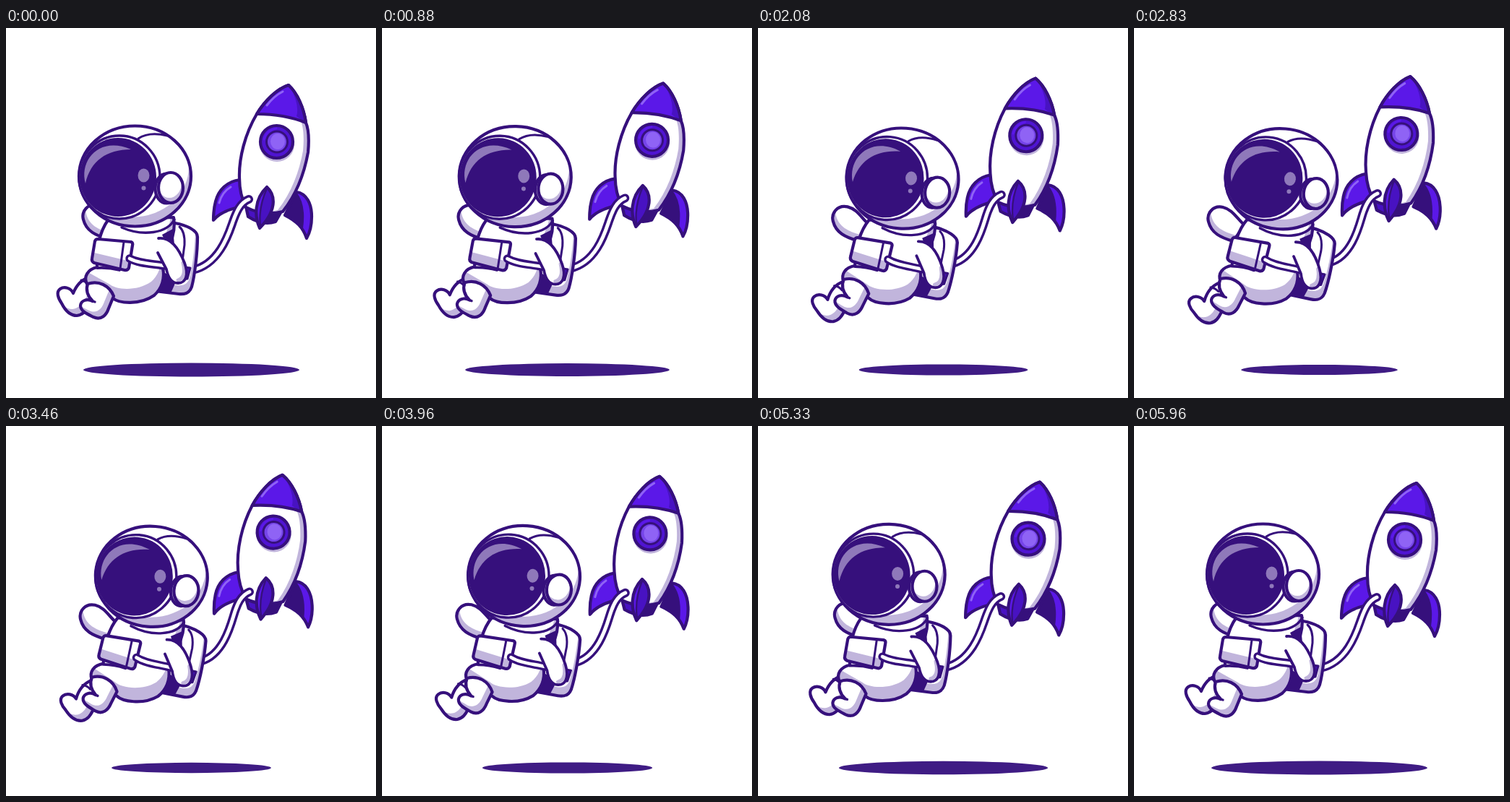
An HTML page that plays this animation: 512 by 512 pixels, repeating every 6000 ms.

```html
<!DOCTYPE html>
<html lang="en">
<head>
<meta charset="utf-8">
<title>Floating astronaut</title>
<style>
  html, body { margin: 0; width: 100%; height: 100%; overflow: hidden; background: #fff; }
  svg { display: block; width: 100vw; height: 100vh; }
</style>
</head>
<body>
<svg id="stage" viewBox="0 0 512 512" stroke-linecap="round" stroke-linejoin="round"></svg>
<script>
const INK = '#36107c', TINT = '#c1b5dc', VIOLET = '#5b18e8', DEEP = '#4812c2', PALE = '#8f63f5';
const LOOP = 6000;
const stage = document.getElementById('stage');
let clips = 0;

const fill = (d, color) => `<path d="${d}" fill="${color}"/>`;
const line = (d, width = 3.8, color = INK) =>
  `<path d="${d}" fill="none" stroke="${color}" stroke-width="${width}"/>`;
const oval = (cx, cy, rx, ry = rx) =>
  `M${cx - rx} ${cy}a${rx} ${ry} 0 1 1 ${2 * rx} 0a${rx} ${ry} 0 1 1 ${-2 * rx} 0Z`;
const group = (id, content) => `<g id="${id}">${content}</g>`;

// Filled outline with details clipped to its inside.
function part(d, color, details = '', width = 4.2) {
  const id = 'clip' + clips++;
  return `<clipPath id="${id}"><path d="${d}"/></clipPath>` + fill(d, color) +
    `<g clip-path="url(#${id})">${details}</g>` + line(d, width);
}

// White surface whose far edge falls into a tinted crescent.
const lit = (d, dx, dy, details = '') =>
  part(d, TINT, `<g transform="translate(${dx} ${dy})">${fill(d, '#fff')}</g>` + details);

function rocket() {
  const hull = 'M391 79C375 84 358 101 347 119C331 146 322 180 323 208C323 224 327 238 332 248' +
    'Q357 261 383 254C402 230 413 200 418 172C420 150 418 138 415 131C412 110 403 90 391 79Z';
  const cone = 'M391 79C375 84 358 101 347 119Q385 119 415 131C412 110 403 90 391 79Z';
  const leftFin = 'M324 210C306 212 294 224 290 240C287 251 287 259 287 266C295 256 308 250 331 246Z';
  const rightFin = 'M402 227C416 229 423 243 423 261C423 275 420 284 416 291C411 276 402 267 386 259Z';
  const keel = 'M361 220C374 232 374 254 351 277C344 261 343 237 361 220Z';
  return part(leftFin, VIOLET, line('M295 242Q299 227 311 220', 3, PALE)) +
    part(rightFin, VIOLET, fill('M400 225Q416 242 411 277L384 260Z', INK)) +
    part('M332 247L335 261Q355 274 373 268L382 252Z', DEEP, fill('M352 250H385L372 272H354Z', INK)) +
    lit(hull, -7, -2, fill(oval(375, 161, 24), TINT)) +
    part(cone, VIOLET, fill('M391 77Q407 106 402 122L420 136L414 90Z', DEEP) + line('M361 107Q371 94 383 88', 3, PALE)) +
    part(oval(374.5, 157.5, 22.5), '#4f14d2', line('M357 154Q361 141 374 139', 3, VIOLET)) +
    part(oval(375, 157.5, 14.5), '#7644ea', fill(oval(376, 157, 10, 11), PALE), 3) +
    part(keel, VIOLET, fill('M361 218C354 240 350 258 352 280L380 260V225Z', DEEP)) +
    line('M361 222C353 240 350 258 352 274', 2.4);
}

function pack() {
  const bag = 'M234 270C250 273 265 280 265 289C265 311 261 343 257 358C254 367 248 369 239 368L206 364L216 285Z';
  return lit(bag, -3, -12) +
    line('M240 275Q248 282 247 300L243 330', 3) +
    fill('M214 335L236 349L228 367L208 362Z', INK) +
    part('M246 331L255 332L251 347L236 349Z', DEEP, '', 3);
}

const raisedArm = () => lit(
  'M157 270C146 260 140 248 127 245C113 242 104 254 107 265C111 281 124 287 141 292Z', 4, -8);

const rearLeg = () => lit(
  'M117 344C103 348 97 357 93 367C90 360 81 357 75 361C69 365 72 374 77 381' +
  'C82 391 88 398 98 398C106 397 110 392 114 386L131 360Z', -6, -9) +
  line('M104 349Q110 350 114 356', 3);

function torso() {
  const suit = 'M141 266C131 280 125 302 126 331C113 334 107 344 112 354L148 374' +
    'C156 381 185 384 205 370C216 360 220 346 217 332L227 298Q235 280 232 262Z';
  return lit(suit, -4, -19) +
    line('M126 332Q142 331 157 335') +
    fill('M216 286L231 278L233 300L225 306Z', INK) +
    line('M160 276C190 289 223 284 233 265', 3.4);
}

const frontLeg = () => lit(
  'M113 354C110 363 113 371 120 378C112 374 104 377 103 384C103 392 113 396 121 400' +
  'C132 405 139 397 142 388L149 371C143 356 128 349 113 354Z', -6, -9) +
  line('M120 378L123 379', 3.4);

function chest() {
  const box = 'M127 292L173 296Q176 297 175 301L170 332Q168 336 164 335L122 325Q118 323 119 319L123 295Q124 292 127 292Z';
  const tube = 'M171 319C184 326 201 326 219 329';
  const arm = 'M211 291C229 289 240 307 247 325C253 341 249 353 238 353C229 353 224 344 222 334L210 311';
  return lit(box, 0, -14) +
    line('M163 296L158 333', 3) +
    line(tube, 11.4) + line(tube, 4.6, '#fff') +
    fill(arm + 'L199 299Z', '#fff') + line('M245 325Q250 345 238 349', 5, TINT) + line(arm);
}

function helmet() {
  return lit(oval(178.5, 205, 77.5, 69.5), -3, -13) +
    line('M183 153Q198 143 223 149', 3) +
    part(oval(157, 206.5, 56, 57.5), '#fff', '', 3.4) +
    fill(oval(155, 206.5, 53, 54.5), INK) +
    fill('M110 215C101 182 130 149 173 168C139 168 117 184 110 215Z', '#8f79ba') +
    fill(oval(190.5, 204, 8, 9.5), '#8f79ba') + fill(oval(190.5, 221.5, 3), '#8f79ba') +
    part(oval(222, 222, 15.5, 20.5), TINT) +
    lit(oval(228, 221, 17, 21), -2, -7);
}

stage.innerHTML =
  '<ellipse id="shadow" cx="256.5" cy="473" fill="#3f1c84"/>' +
  group('rocket', rocket()) +
  `<path id="hoseEdge" fill="none" stroke="${INK}" stroke-width="12"/>` +
  '<path id="hose" fill="none" stroke="#fff" stroke-width="5"/>' +
  group('pack', pack()) + group('raisedArm', raisedArm()) + group('rearLeg', rearLeg()) +
  group('torso', torso()) + group('frontLeg', frontLeg()) +
  group('chest', chest()) + group('helmet', helmet());

const set = (id, attrs) => {
  const node = document.getElementById(id);
  for (const key in attrs) node.setAttribute(key, attrs[key]);
};
const pose = (id, p, dx, dy, angle, px, py) =>
  set(id, { transform: `translate(${dx * p} ${dy * p}) rotate(${angle * p} ${px} ${py})` });
const lean = (id, p, dx = 0, dy = 0) => pose(id, p, dx, dy, 5, 157, 440);

// Sine-eased swing that rises until `peak` and falls until the loop ends.
function swing(t, peak) {
  const phase = t < peak ? t / peak : (LOOP - t) / (LOOP - peak);
  return (1 - Math.cos(Math.PI * phase)) / 2;
}

function draw(ms) {
  const t = ms % LOOP;
  const lift = swing(t, 3000), sway = swing(t, 2800);
  const mix = (a, b, p = lift) => a + (b - a) * p;
  const point = (x1, y1, x2, y2, p) => `${mix(x1, x2, p)} ${mix(y1, y2, p)} `;

  set('shadow', { rx: mix(149.5, 108), ry: mix(9.5, 7) });
  pose('rocket', lift, 0.8, -9.6, -3, 343, 262);

  const hose = 'M' + point(336, 237, 337, 229) + 'C' + point(324, 242, 325, 234) +
    point(319, 254, 320, 246) + point(314, 268, 316, 259) +
    'S' + point(296, 327, 302, 315, sway) + point(258, 335, 272, 324, sway);
  set('hoseEdge', { d: hose });
  set('hose', { d: hose });

  ['pack', 'torso', 'chest'].forEach(id => lean(id, sway));
  lean('frontLeg', sway, -1, -3.5);
  lean('helmet', sway, 5, 1);
  pose('raisedArm', lift, -4, 3, 0, 0, 0);
  pose('rearLeg', lift, 2, 8, -7, 120, 350);
}

const start = performance.now();
function tick() {
  draw(performance.now() - start);
  requestAnimationFrame(tick);
}
tick();
</script>
</body>
</html>
```
